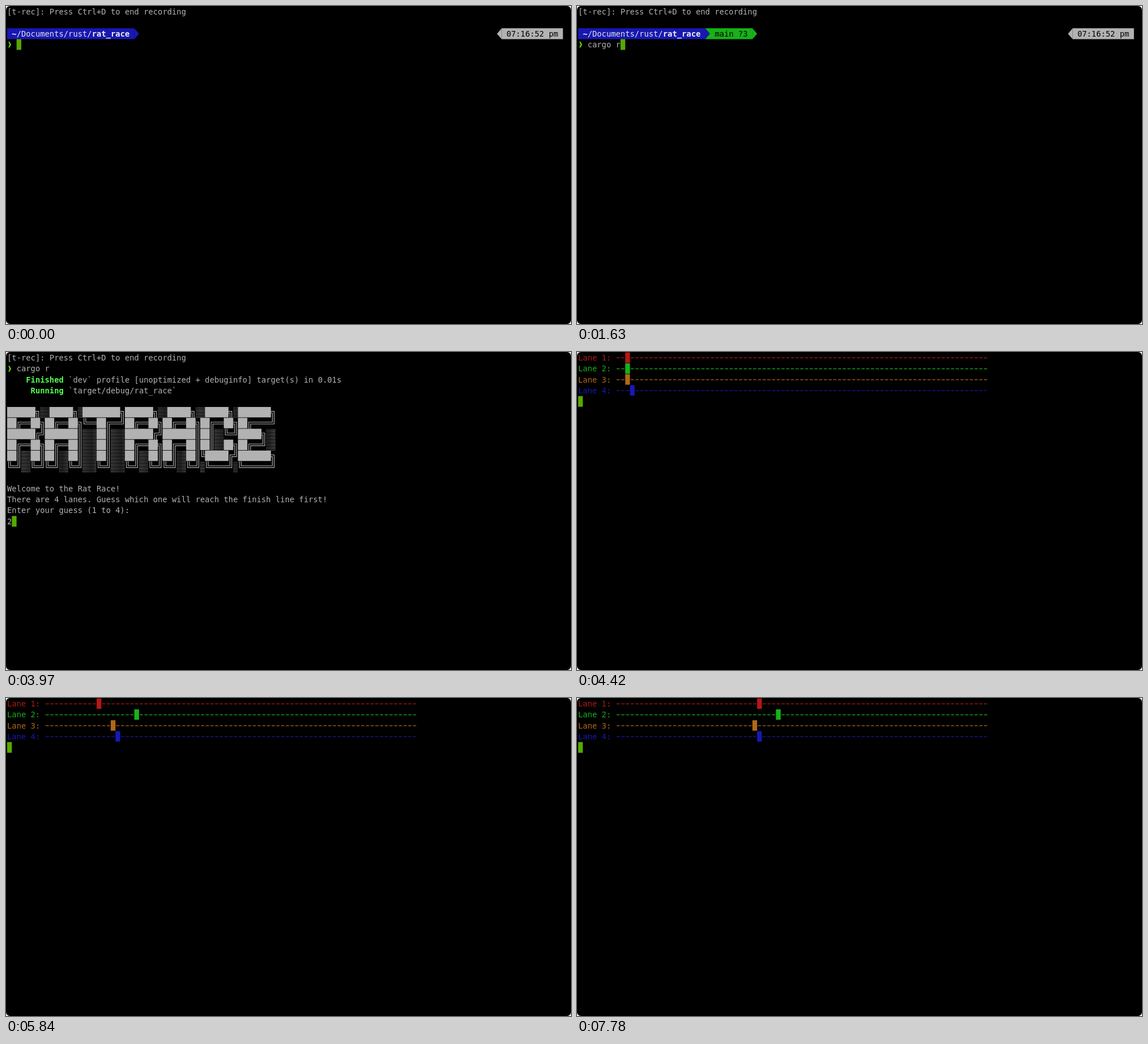
These frames come from a looping animation (998x561 px, 8000 ms). An HTML page:

```html
<!DOCTYPE html>
<html lang="en">
<head>
<meta charset="utf-8">
<title>Rat Race</title>
<style>
  html, body { margin: 0; width: 100%; height: 100%; overflow: hidden; background: #fff; }
  svg { display: block; width: 100vw; height: 100vh; }
  text { font: 13.82px "DejaVu Sans Mono", monospace; white-space: pre; }
  .b { font-weight: bold; }
</style>
</head>
<body>
<svg viewBox="0 0 998 561" preserveAspectRatio="none">
  <defs>
    <pattern id="shade" width="2.08" height="2.4" patternUnits="userSpaceOnUse">
      <rect width="1.04" height="1.2" fill="#b2b2b2" opacity=".85"/>
    </pattern>
  </defs>
  <rect width="998" height="561" rx="7"/>
  <g id="screen"></g>
</svg>
<script>
const LOOP = 8000;
const CW = 8.32, RH = 19.23, BLOCK = 18.4;
const GRAY = '#b2b2b2', GREEN = '#18b218', BLUE = '#1818b2';
const CURSOR = '#56a900', PROMPT = '#5fd700', BRIGHT = '#54ff54';
const screen = document.getElementById('screen');

const X = col => 2 + col * CW;
const Y = row => 0.8 + row * RH;
const n = v => v.toFixed(2);

const text = (col, row, str, fill = GRAY, cls = '') =>
  `<text x="${n(X(col))}" y="${n(Y(row) + 14.3)}" fill="${fill}" class="${cls}">${str}</text>`;
const rect = (col, row, cols, fill, h = BLOCK) =>
  `<rect x="${n(X(col))}" y="${n(Y(row))}" width="${n(cols * CW)}" height="${h}" fill="${fill}"/>`;
const cursor = (col, row) => rect(col, row, 1, CURSOR, 18.9);
const path = (d, fill) => `<path d="${d}" fill="${fill}"/>`;

// Triangle filling one cell; dir 1 points right, -1 left
function arrow(col, row, dir, fill) {
  const base = X(dir > 0 ? col : col + 1), y = Y(row);
  return path(`M${n(base)} ${n(y)}l${n(dir * CW)} ${RH / 2}l${n(-dir * CW)} ${RH / 2}z`, fill);
}

const chevron = row =>
  path(`M4.1 ${n(Y(row) + 4.5)}h2.2l2.8 5.1l-2.8 5.1h-2.2l2.2 -5.1z`, PROMPT);

const header = text(0, 0, '[t-rec]: Press Ctrl+D to end recording');

function promptScreen(typed, git) {
  let s = header;
  if (git) {
    s += rect(27, 2, 10, GREEN, RH) + arrow(37, 2, 1, GREEN) + text(29, 2, 'main ?3', '#000');
  }
  s += rect(0, 2, 27, BLUE, RH) + arrow(27, 2, 1, BLUE);
  s += text(1, 2, '~', '#eee', 'b') + text(2, 2, '/Documents/rust/', '#e4e4e4')
    + text(18, 2, 'rat_race', '#eee', 'b');
  s += arrow(104, 2, -1, GRAY) + rect(105, 2, 13, GRAY, RH) + text(106, 2, '07:16:52 pm', '#000');
  return s + chevron(3) + text(2, 3, typed) + cursor(2 + typed.length, 3);
}

const GLYPHS = {
  R: ['██████╗░', '██╔══██╗', '██████╔╝', '██╔══██╗', '██║░░██║', '╚═╝░░╚═╝'],
  A: ['░█████╗░', '██╔══██╗', '███████║', '██╔══██║', '██║░░██║', '╚═╝░░╚═╝'],
  T: ['████████╗', '╚══██╔══╝', '░░░██║░░░', '░░░██║░░░', '░░░██║░░░', '░░░╚═╝░░░'],
  C: ['░█████╗░', '██╔══██╗', '██║░░╚═╝', '██║░░██╗', '╚█████╔╝', '░╚════╝░'],
  E: ['███████╗', '██╔════╝', '█████╗░░', '██╔══╝░░', '███████╗', '╚══════╝']
};
// Directions in which each corner's arms leave the cell centre
const CORNERS = { '╔': [1, 1], '╗': [-1, 1], '╚': [1, -1], '╝': [-1, -1] };

function doubleLine(ch, col, row) {
  const x = X(col), y = Y(row), cx = x + CW / 2, cy = y + BLOCK / 2, gap = 1.6;
  return [-gap, gap].map(o => {
    if (ch === '═') return `M${n(x)} ${n(cy + o)}h${CW}`;
    if (ch === '║') return `M${n(cx + o)} ${n(y)}v${RH}`;
    const [h, v] = CORNERS[ch];
    const endX = h > 0 ? x + CW : x, endY = v > 0 ? y + RH : y;
    return `M${n(endX)} ${n(cy + o * v)}H${n(cx + o * h)}V${n(endY)}`;
  }).join('');
}

function banner(word, top) {
  let s = '', lines = '';
  for (let r = 0; r < 6; r++) {
    const str = [...word].map(c => GLYPHS[c][r]).join('');
    for (const { 0: run, index } of str.matchAll(/█+|░+|[═║╔╗╚╝]/g)) {
      if (run[0] === '█') s += rect(index, top + r, run.length, GRAY);
      else if (run[0] === '░') s += rect(index, top + r, run.length, 'url(#shade)', RH);
      else lines += doubleLine(run, index, top + r);
    }
  }
  return s + `<path d="${lines}" fill="none" stroke="${GRAY}" stroke-width="1.15"/>`;
}

function guessScreen(typed) {
  return header + chevron(1) + text(2, 1, 'cargo r')
    + text(4, 2, 'Finished', BRIGHT, 'b')
    + text(13, 2, '`dev` profile [unoptimized + debuginfo] target(s) in 0.01s')
    + text(5, 3, 'Running', BRIGHT, 'b') + text(13, 3, '`target/debug/rat_race`')
    + banner('RATRACE', 5)
    + text(0, 12, 'Welcome to the Rat Race!')
    + text(0, 13, 'There are 4 lanes. Guess which one will reach the finish line first!')
    + text(0, 14, 'Enter your guess (1 to 4):')
    + text(0, 15, typed) + cursor(typed.length, 15);
}

const LANES = ['#b21818', GREEN, '#b26818', BLUE];

function raceScreen(...cols) {
  return LANES.map((color, i) => {
    const y = n(Y(i) + 9.6), dash = 5.6, pad = (CW - dash) / 2;
    return text(0, i, `Lane ${i + 1}:`, color)
      + `<path d="M${n(X(8) + pad)} ${y}H${n(X(87) - pad)}" stroke="${color}" stroke-width="1.25" stroke-dasharray="${dash} ${n(CW - dash)}"/>`
      + rect(cols[i], i, 1, '#000') + rect(cols[i], i, 1, color);
  }).join('') + cursor(0, 4);
}

const steps = [
  [0, promptScreen('', false)],
  [250, promptScreen('', true)],
  [710, promptScreen('c', true)],
  [1170, promptScreen('car', true)],
  [1630, promptScreen('cargo r', true)],
  [2120, guessScreen('')],
  [3970, guessScreen('2')],
  [4420, raceScreen(10, 10, 10, 11)],
  [4900, raceScreen(12, 15, 14, 15)],
  [5380, raceScreen(15, 21, 18, 19)],
  [5840, raceScreen(19, 27, 22, 23)],
  [6320, raceScreen(25, 29, 26, 27)],
  [6820, raceScreen(31, 35, 31, 32)],
  [7320, raceScreen(35, 40, 33, 36)],
  [7780, raceScreen(38, 42, 37, 38)]
];

let shown;
function draw(t) {
  const step = steps.findLast(([start]) => start <= t);
  if (step !== shown) screen.innerHTML = step[1];
  shown = step;
}

const began = performance.now();
function tick() {
  draw((performance.now() - began) % LOOP);
  requestAnimationFrame(tick);
}
tick();
</script>
</body>
</html>
```
